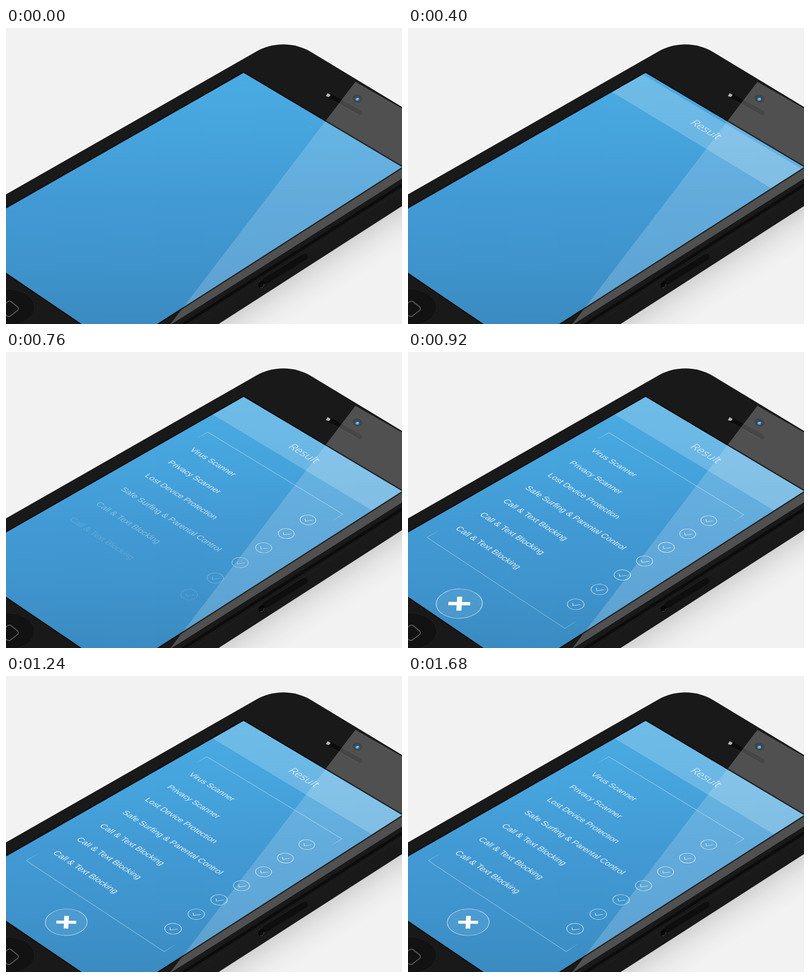
Animation of 800x600 px, one loop 1.72 s. Source, as an HTML page with a canvas:

```html
<!DOCTYPE html>
<html lang="en">
<head>
<meta charset="utf-8">
<title>Scan result</title>
<style>
html, body { margin: 0; width: 800px; height: 600px; overflow: hidden; background: #f2f2f3; }
canvas { display: block; }
</style>
</head>
<body>
<canvas id="stage" width="800" height="600"></canvas>
<script>
const ctx = document.getElementById('stage').getContext('2d');
const LOOP = 1720, STEP = 40;
const W = 320, H = 568;
const CORNERS = [[480, 91], [800, 282], [226.8, 650.2], [-103.75, 425.4]];
const GLARE = [[706, 109], [800, 163], [800, 305], [330, 603]];
const ROWS = ['Virus Scanner', 'Privacy Scanner', 'Lost Device Protection',
  'Safe Surfing & Parental Control', 'Call & Text Blocking',
  'Call & Text Blocking', 'Call & Text Blocking'];

// Perspective map from the flat 320 x 568 screen to the stage.
const view = (([a, b, c, d]) => {
  const p = [b[0] - c[0], b[1] - c[1]], q = [d[0] - c[0], d[1] - c[1]];
  const s = [0, 1].map(i => a[i] - b[i] + c[i] - d[i]);
  const det = p[0] * q[1] - q[0] * p[1];
  const g = (s[0] * q[1] - q[0] * s[1]) / det;
  const h = (p[0] * s[1] - s[0] * p[1]) / det;
  const axis = i => [b[i] - a[i] + g * b[i], d[i] - a[i] + h * d[i], a[i]];
  return { g, h, x: axis(0), y: axis(1) };
})(CORNERS);

function project(x, y) {
  const u = x / W, v = y / H, w = 1 + view.g * u + view.h * v;
  return [view.x, view.y].map(k => (k[0] * u + k[1] * v + k[2]) / w);
}

// Draws in screen units around (x, y), using the local tilt of the screen.
function local(x, y, scale, draw) {
  const [px, py] = project(x, y);
  const [ux, uy] = project(x + 1, y), [vx, vy] = project(x, y + 1);
  ctx.save();
  ctx.transform(ux - px, uy - py, vx - px, vy - py, px, py);
  ctx.scale(scale, scale);
  draw();
  ctx.restore();
}

function trace(points, close) {
  ctx.beginPath();
  points.forEach(([x, y]) => ctx.lineTo(x, y));
  if (close) ctx.closePath();
}

function fill(points, color) {
  trace(points, true);
  ctx.fillStyle = color;
  ctx.fill();
}

function stroke(points, color, width, close) {
  trace(points, close);
  ctx.strokeStyle = color;
  ctx.lineWidth = width;
  ctx.stroke();
}

function ellipse(x, y, rx, ry, color, turn = 0) {
  ctx.beginPath();
  ctx.ellipse(x, y, rx, ry, turn, 0, Math.PI * 2);
  ctx.fillStyle = color;
  ctx.fill();
}

function gradient(x0, y0, x1, y1, colors) {
  const g = ctx.createLinearGradient(x0, y0, x1, y1);
  colors.forEach((c, i) => g.addColorStop(i / (colors.length - 1), c));
  return g;
}

const clamp = v => Math.max(0, Math.min(1, v));
const progress = (t, start, length) => clamp((t - start) / length);
const backOut = (p, c = 1.7) => 1 + (c + 1) * (p - 1) ** 3 + c * (p - 1) ** 2;
const white = a => `rgba(255,255,255,${a})`;

function bodyPath() {
  ctx.beginPath();
  ctx.moveTo(-10, 343);
  ctx.lineTo(506, 47.5);
  ctx.bezierCurveTo(540, 28.5, 582, 28.5, 616, 48.5);
  ctx.lineTo(810, 166);
  ctx.lineTo(810, 354.5);
  ctx.lineTo(414, 610);
  ctx.lineTo(-10, 610);
  ctx.closePath();
}

function drawPhone() {
  ctx.fillStyle = '#f2f2f3';
  ctx.fillRect(0, 0, 800, 600);
  fill([[800, 355], [800, 600], [425, 600]],
    gradient(615, 480, 655, 542, ['#d3d3d4', '#e3e3e4', '#ededee', '#f2f2f3']));

  bodyPath();
  ctx.fillStyle = '#191919';
  ctx.fill();
  ctx.save();
  ctx.clip();
  ctx.lineCap = 'round';
  ctx.lineJoin = 'round';

  stroke([[810, 312], [340, 612]], '#0c0c0c', 6);
  stroke([[810, 322], [350, 617]], '#222', 1);
  stroke([[524, 513], [603, 464]], '#0e0e0e', 13);
  ellipse(516.5, 520.5, 6, 8, '#060606', 0.5);
  ctx.beginPath();
  ctx.ellipse(516.5, 521, 4.5, 6, 0.5, -0.7, 1.5);
  ctx.strokeStyle = '#666';
  ctx.lineWidth = 1;
  ctx.stroke();

  ellipse(2, 566, 56, 37, '#121212');
  ctx.strokeStyle = '#202020';
  ctx.stroke();
  ctx.beginPath();
  ctx.moveTo(-6, 562);
  ctx.arcTo(7, 552, 28, 569, 6);
  ctx.arcTo(28, 569, 6, 586, 5);
  ctx.arcTo(6, 586, -18, 571, 6);
  ctx.lineTo(-8, 578);
  ctx.strokeStyle = '#606060';
  ctx.lineWidth = 1.8;
  ctx.stroke();

  stroke([[652, 137], [715, 172]], '#0c0c0c', 10);
  stroke([[657, 145], [712, 176]], '#2b2b2b', 1);
  ellipse(710, 143, 10, 8, '#080808', 0.3);
  fill(GLARE, white(0.24));
  fill([[646, 138], [650, 132], [656, 136], [652, 140]], '#b5b5b5');
  ellipse(710, 144, 5, 4, '#2369a0');
  ellipse(709.5, 144.5, 3, 2.4, '#58b5ee');
  ellipse(711, 143, 1, 1, '#d8f0ff');
  ctx.restore();

  stroke(CORNERS, 'rgba(8,8,8,.65)', 5, true);
}

function drawBracket(y, tick, alpha) {
  const a = project(26, y), b = project(297, y);
  const ends = [project(26, y + tick), project(297, y + tick)];
  stroke([a, b], white(0.55 * alpha), 1);
  [a, b].forEach((p, i) =>
    stroke([p, ends[i]], gradient(...p, ...ends[i], [white(0.55 * alpha), white(0.1 * alpha)]), 1));
}

function drawTitle(t) {
  const bar = -66 * (1 - backOut(progress(t, 135, 525)));
  const edge = [[0, bar - 66], [W, bar - 66], [W, bar], [0, bar]];
  fill(edge.map(([x, y]) => project(x, y + 66)), white(0.2));

  const p = progress(t, -10, 400);
  local(160, 25 + 12 * p * (2 - p), backOut(p, 2), () => {
    ctx.font = '300 20px "Open Sans", sans-serif';
    ctx.textAlign = 'center';
    ctx.fillStyle = white(clamp(0.3 + 3 * p) * 0.95);
    ctx.fillText('Result', 0, 7);
  });
}

function drawRow(label, i, t) {
  const p = progress(t, 540 + 35 * i, 400);
  if (!p) return;
  const y = 151.4 + 44.55 * i + 25 * (1 - backOut(p));
  ctx.globalAlpha = clamp(2.5 * p - 0.1);
  ctx.font = '14px "Liberation Sans", Arial, sans-serif';
  ctx.textAlign = 'center';
  const half = ctx.measureText(label).width / 2;
  local(39 + half, y, 1, () => {
    ctx.fillStyle = white(0.85);
    ctx.fillText(label, 0, 5);
  });
  local(271.4, y, 1, () => {
    ctx.beginPath();
    ctx.arc(0, 0, 11.3, 0, Math.PI * 2);
    ctx.strokeStyle = white(0.75);
    ctx.lineWidth = 0.9;
    ctx.stroke();
    stroke([[-4.8, 1], [-0.5, 4.6], [4.8, -4.2]], white(0.8), 0.9);
  });
  ctx.globalAlpha = 1;
}

function drawButton(t) {
  const p = progress(t, 803, 450);
  if (!p) return;
  local(161.5, 512.5 + 100 * (1 - backOut(p)), 1 + 0.18 * (1 - p) ** 2, () => {
    ctx.beginPath();
    ctx.arc(0, 0, 28, 0, Math.PI * 2);
    ctx.fillStyle = white(0.07);
    ctx.fill();
    ctx.strokeStyle = white(0.65);
    ctx.lineWidth = 0.9;
    ctx.stroke();
    ctx.rotate(Math.PI / 4);
    ctx.fillStyle = '#fff';
    ctx.fillRect(-13.3, -3.1, 26.6, 6.2);
    ctx.fillRect(-3.1, -13.3, 6.2, 26.6);
  });
}

function drawScreen(t) {
  ctx.save();
  trace(CORNERS, true);
  ctx.clip();
  ctx.fillStyle = gradient(0, 91, 0, 600, ['#4aabe2', '#46a4dd', '#429ad4', '#3f94cd', '#3a8bc1']);
  ctx.fillRect(0, 0, 800, 600);

  drawTitle(t);
  const top = progress(t, 480, 400), bottom = progress(t, 800, 400);
  if (top) drawBracket(105 + 25 * (1 - backOut(top)), 22, clamp(2 * top));
  ROWS.forEach((label, i) => drawRow(label, i, t));
  if (bottom) drawBracket(461 + 25 * (1 - backOut(bottom)), -22, clamp(3 * bottom));
  drawButton(t);

  fill(GLARE, white(0.17));
  ctx.restore();
}

function frame(now) {
  const t = Math.floor((now % LOOP) / STEP) * STEP;
  drawPhone();
  drawScreen(t);
  requestAnimationFrame(() => frame(performance.now() - begin));
}

const begin = performance.now();
frame(0);
</script>
</body>
</html>
```
